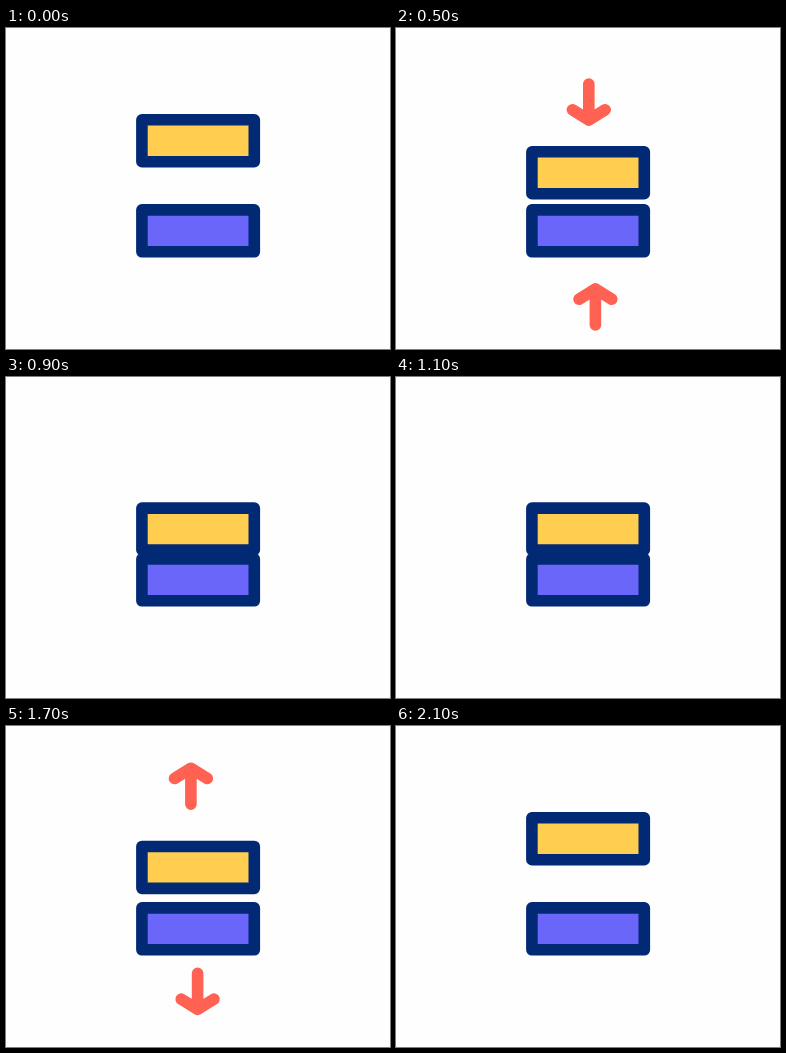
Recreate the animation shown at these times as an HTML page. Size 384 by 321 pixels, loop 2.2 s.

```html
<!DOCTYPE html>
<html>
<head>
<meta charset="utf-8">
<style>
html, body { margin: 0; height: 100%; overflow: hidden; background: #fefefe; }
svg { display: block; width: 384px; height: 321px; }
path, rect { stroke-width: 11.6; stroke-linecap: round; stroke-linejoin: round; }
rect { stroke: #022a74; }
path { fill: none; }
.arrow { stroke: #ff6152; }
.spark { stroke: #ffcd50; stroke-width: 11; }
</style>
</head>
<body>
<svg viewBox="0 0 384 321">
  <rect id="lid" x="135.9" width="112.4" height="41.9" fill="#ffcd50"/>
  <rect x="135.9" y="181.9" width="112.4" height="41.9" fill="#6a66fa"/>
  <g id="extras"></g>
</svg>
<script>
const lid = document.getElementById('lid');
const extras = document.getElementById('extras');

// Smooth 0 to 1 between two times
function ease(t, from, to) {
  const u = Math.min(1, Math.max(0, (t - from) / (to - from)));
  return u * u * (3 - 2 * u);
}

// The upper box drops, settles on the lower one, loosens and rises again
const topAt = t => 86
  + 32 * (ease(t, 0, 500) - ease(t, 1600, 2100))
  + 7.3 * (ease(t, 500, 800) - ease(t, 1200, 1600));

const arrow = (x, tip, dir) =>
  `<path class="arrow" transform="translate(${x} ${tip}) scale(1 ${dir})" d="M-16.4 10.2L0 0L16.4 10.2M0 0V36"/>`;

// Sparks drift right as they swing; the lower row is mirrored and drifts further
function spark(x, y, turn, flip, swing) {
  const drift = (2 - flip) * swing;
  return `<path class="spark" transform="translate(${x + drift} ${y}) scale(1 ${flip}) rotate(${turn + 11.5 * swing})" d="M-17.3 -17.8L-6.3 5.3L5.8 -6.3L17 17.3"/>`;
}

const burst = swing =>
  spark(75, 110, 0, 1, swing) + spark(303.8, 119.5, 90, 1, swing) +
  spark(70.3, 226.5, 0, -1, swing) + spark(306.8, 218.5, 90, -1, swing);

function draw(t) {
  const top = topAt(t);
  const during = (from, to) => t >= from && t < to;
  let parts = '';
  if (during(100, 700)) parts += arrow(192.8, top - 26, -1) + arrow(199.4, 261, 1);
  if (during(1300, 2100)) parts += arrow(184.9, top - 72.4, 1) + arrow(191.6, 283.3, -1);
  if (during(600, 900)) parts += burst(1 - Math.abs(t - 700) / 160);
  if (during(1300, 1600)) parts += burst((1400 - t) / 160);
  lid.setAttribute('y', top + 5.8);
  extras.innerHTML = parts;
}

// The picture advances in steps of 100 ms
const start = performance.now();
function tick() {
  draw(Math.floor((performance.now() - start) % 2200 / 100) * 100);
  requestAnimationFrame(tick);
}
tick();
</script>
</body>
</html>
```
